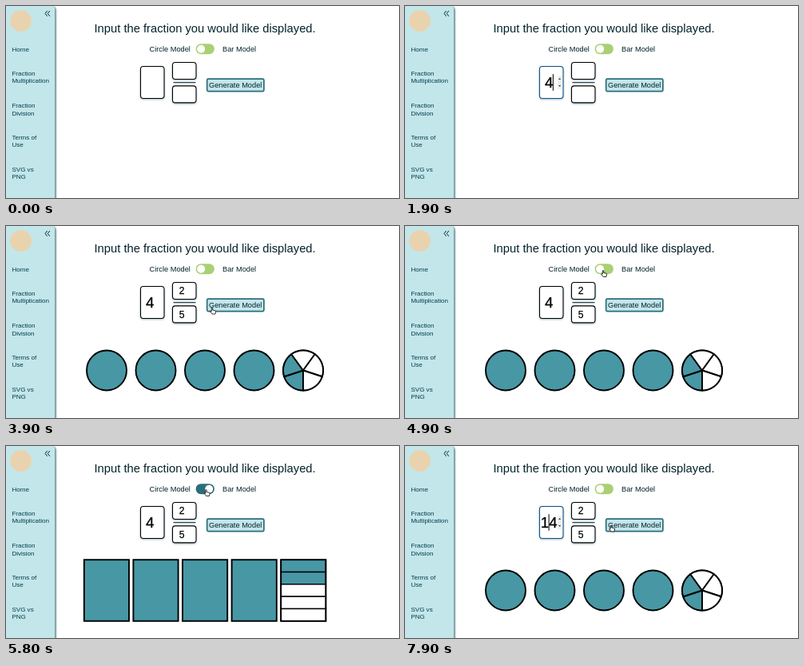
An HTML page for the animation above (8000 ms loop, 492 by 240 pixels).

```html
<!DOCTYPE html>
<html lang="en">
<head>
<meta charset="utf-8">
<title>Fraction model</title>
<style>
  html, body { margin: 0; width: 100%; height: 100%; overflow: hidden; background: #fff; }
  svg { display: block; width: 492px; height: 240px; }
  text { font-family: "Liberation Sans", Arial, sans-serif; fill: #04222b; }
  .nav { font-size: 8.05px; fill: #003d4c; }
  .label { font-size: 9.25px; }
  .digit { text-anchor: middle; fill: #000; stroke: #000; stroke-width: .25; }
  .side { fill: #c3e6ea; filter: drop-shadow(1.6px 1.6px .8px #17505d); }
  .shape { stroke: #000; stroke-width: 1.9; }
  .row { stroke: #000; stroke-width: 1.4; }
  .field { fill: #fff; stroke: #000; stroke-width: 1.1; filter: drop-shadow(0 1px .8px #5b8b9a99); }
  .field.focus { stroke: #0f5288; }
</style>
</head>
<body>
<svg id="stage" viewBox="0 0 492 240">
  <path class="side" d="M-5 0H57Q61.3 0 61.3 4.3V245H-5Z"/>
  <circle cx="18.5" cy="18.5" r="13.5" fill="#e9d3ae"/>
  <path d="M51.6 6L49 9.4L51.6 12.8M54.8 6L52.2 9.4L54.8 12.8" fill="none" stroke="#062c36"/>
  <g id="nav"></g>
  <text x="110.5" y="33.3" font-size="14.75">Input the fraction you would like displayed.</text>
  <text class="label" x="179.5" y="57">Circle Model</text>
  <text class="label" x="271" y="57">Bar Model</text>
  <rect id="track" x="237.6" y="47.2" width="23.3" height="13" rx="6.5"/>
  <circle id="knob" cy="53.7" r="5" fill="#fff"/>
  <path d="M209.5 95.7H237.5" stroke="#04222b" stroke-width="1.1"/>
  <g id="fields"></g>
  <rect x="251.7" y="91.2" width="71.2" height="15.4" rx="1.5" fill="#c3e6ea" stroke="#2b6d7b" stroke-width="1.7"/>
  <text class="label" x="254" y="102.3">Generate Model</text>
  <g id="circles"></g>
  <g id="bars"></g>
  <g id="mouse">
    <path id="arrow" d="M0 0V7L1.7 5.5L2.9 8L4 7.5L2.9 5.1H5Z" fill="#000" stroke="#fff" stroke-width=".5"/>
    <path id="beam" d="M-1.3 -4Q0 -4 0 -3Q0 -4 1.3 -4M0 -3V3M-1.3 4Q0 4 0 3Q0 4 1.3 4" fill="none" stroke="#222" stroke-width=".8"/>
    <path id="hand" d="M-.7 .4Q0 -.6 .7 .4V3L4 3.8Q4.8 4 4.6 5L4 8H.2L-2.4 4.6Q-2 3.6 -.7 4.6Z" fill="#fff" stroke="#000" stroke-width=".8"/>
  </g>
</svg>
<script>
const LOOP = 8000, STEP = 100, TEAL = "#4897a5";
const $ = id => document.getElementById(id);

function add(parent, tag, attrs, text) {
  const el = document.createElementNS("http://www.w3.org/2000/svg", tag);
  for (const k in attrs) el.setAttribute(k, attrs[k]);
  if (text) el.textContent = text;
  parent.append(el);
  return el;
}
const show = (el, on) => { el.style.display = on ? "" : "none"; };

[["Home", 56.7], ["Fraction", 87.2], ["Multiplication", 96.4], ["Fraction", 127.4], ["Division", 136.6],
 ["Terms of", 167.2], ["Use", 176.4], ["SVG vs", 207.2], ["PNG", 216.4]]
  .forEach(([s, y]) => add($("nav"), "text", { class: "nav", x: 7.4, y }, s));

// Number inputs: whole, numerator, denominator
function makeField(x, y, w, h, size) {
  const g = $("fields"), cx = x + w / 2 - 3.1, cy = y + h / 2;
  const sx = x + w - 4.4, gap = h > 30 ? 4.6 : 3.2;
  const box = add(g, "rect", { class: "field", x, y, width: w, height: h, rx: 3.4 });
  const spin = add(g, "g", {});
  add(spin, "rect", { x: sx - 2.4, y: cy - gap * 1.8, width: 4.8, height: gap * 3.6, fill: "#eee" });
  add(spin, "path", {
    d: `M${sx - 1.6} ${cy - gap + 1}h3.2l-1.6 -2zM${sx - 1.6} ${cy + gap - 1}h3.2l-1.6 2z`, fill: "#444"
  });
  const text = add(g, "text", { class: "digit", x: cx, y: cy + size * .36, "font-size": size });
  const caret = add(g, "path", { stroke: "#000", "stroke-width": 1 });
  return { x, y, w, h, cx, cy, size, box, spin, text, caret };
}
const fields = [
  makeField(168.5, 75.5, 29.5, 40, 18.8),
  makeField(208.5, 70.5, 29.5, 21, 12.2),
  makeField(208.5, 99.9, 29.5, 21, 12.2)
];

for (let i = 0; i < 5; i++) {
  const cx = 126 + i * 61.5, cy = 180.5, r = 25, last = i === 4;
  const rim = a => `${cx + r * Math.cos(a)} ${cy + r * Math.sin(a)}`;
  add($("circles"), "circle", { class: "shape", cx, cy, r, fill: last ? "#fff" : TEAL });
  const x = 97.8 + i * 61.6, y = 142.2, width = 56.2, height = 76.6;
  if (last) for (let k = 0; k < 5; k++) {
    const a = Math.PI / 2 + k * Math.PI * .4, fill = k < 2 ? TEAL : "#fff";
    add($("circles"), "path", {
      class: "shape", fill, "stroke-linejoin": "round",
      d: `M${cx} ${cy}L${rim(a)}A${r} ${r} 0 0 1 ${rim(a + Math.PI * .4)}Z`
    });
    add($("bars"), "rect", { class: "row", x, y: y + k * height / 5, width, height: height / 5, fill });
  }
  add($("bars"), "rect", { class: "shape", x, y, width, height, fill: last ? "none" : TEAL });
}

// Step tables: [time, value]
const values = [
  [[0, ""], [1800, "4"], [7400, "14"]],
  [[0, ""], [2400, "2"]],
  [[0, ""], [2900, "5"]]
];
const focus = [[0, -1], [1400, 0], [2200, 1], [2700, 2], [3600, -1], [7000, 0]];
const caretOn = [[0, true], [3200, false], [6900, true]];
const model = [[0, ""], [3700, "circles"], [5100, "bars"], [6000, "circles"]];
const hidden = [[0, true], [100, false], [1800, true], [2900, false], [7300, true], [7500, false]];
const path = [
  [100, 350, 150], [900, 250, 125], [1300, 194, 93], [2900, 194, 93], [3000, 246, 110], [3400, 257.5, 102.5],
  [4000, 258, 102], [4700, 248, 55.5], [4900, 248, 55.5], [5800, 250.5, 54.5], [6100, 250, 54.5],
  [6500, 206, 80], [6800, 176, 97], [7400, 176, 97], [7800, 256, 100], [7900, 258, 99]
];

const at = (table, t) => table.reduce((v, row) => row[0] <= t ? row[1] : v, table[0][1]);
const ease = p => p * p * (3 - 2 * p);
const ramp = (t, from, len) => ease(Math.min(1, Math.max(0, (t - from) / len)));

function mouseAt(t) {
  const i = path.findIndex(p => p[0] > t);
  if (i === 0) return path[0].slice(1);
  if (i < 0) return path[path.length - 1].slice(1);
  const [t0, x0, y0] = path[i - 1], [t1, x1, y1] = path[i], p = ease((t - t0) / (t1 - t0));
  return [x0 + (x1 - x0) * p, y0 + (y1 - y0) * p];
}
const inside = (x, y, b) => x > b.x && x < b.x + b.w && y > b.y && y < b.y + b.h;
const clickable = [{ x: 251, y: 90, w: 73, h: 18 }, { x: 237, y: 47, w: 24, h: 14 }];

function draw(t) {
  const active = at(focus, t);
  fields.forEach((f, i) => {
    const s = at(values[i], t), on = i === active;
    f.text.textContent = s;
    f.box.classList.toggle("focus", on);
    show(f.spin, on);
    show(f.caret, on && at(caretOn, t));
    const half = s.length * f.size * .278;
    const left = f.cx - half;
    const pos = t >= 7000 ? (s.length - 1) * f.size * .556 : half * 2;
    f.caret.setAttribute("d", `M${left + pos} ${f.cy - f.size * .55}v${f.size * 1.1}`);
  });

  const m = at(model, t);
  show($("circles"), m === "circles");
  show($("bars"), m === "bars");

  const on = ramp(t, 5000, 400) - ramp(t, 5900, 400);
  const mix = (a, b) => Math.round(a + (b - a) * on);
  $("track").setAttribute("fill", `rgb(${mix(169, 42)},${mix(208, 109)},${mix(116, 123)})`);
  $("knob").setAttribute("cx", 244.2 + 10 * on);

  const [x, y] = mouseAt(t);
  const hand = clickable.some(b => inside(x, y, b));
  const beam = !hand && fields.some(f => inside(x, y, f));
  show($("mouse"), !at(hidden, t));
  $("mouse").setAttribute("transform", `translate(${x} ${y})`);
  show($("hand"), hand);
  show($("beam"), beam);
  show($("arrow"), !hand && !beam);
}

const start = performance.now();
function tick() {
  const t = (performance.now() - start) % LOOP;
  draw(Math.floor(t / STEP) * STEP);
  requestAnimationFrame(tick);
}
tick();
</script>
</body>
</html>
```
